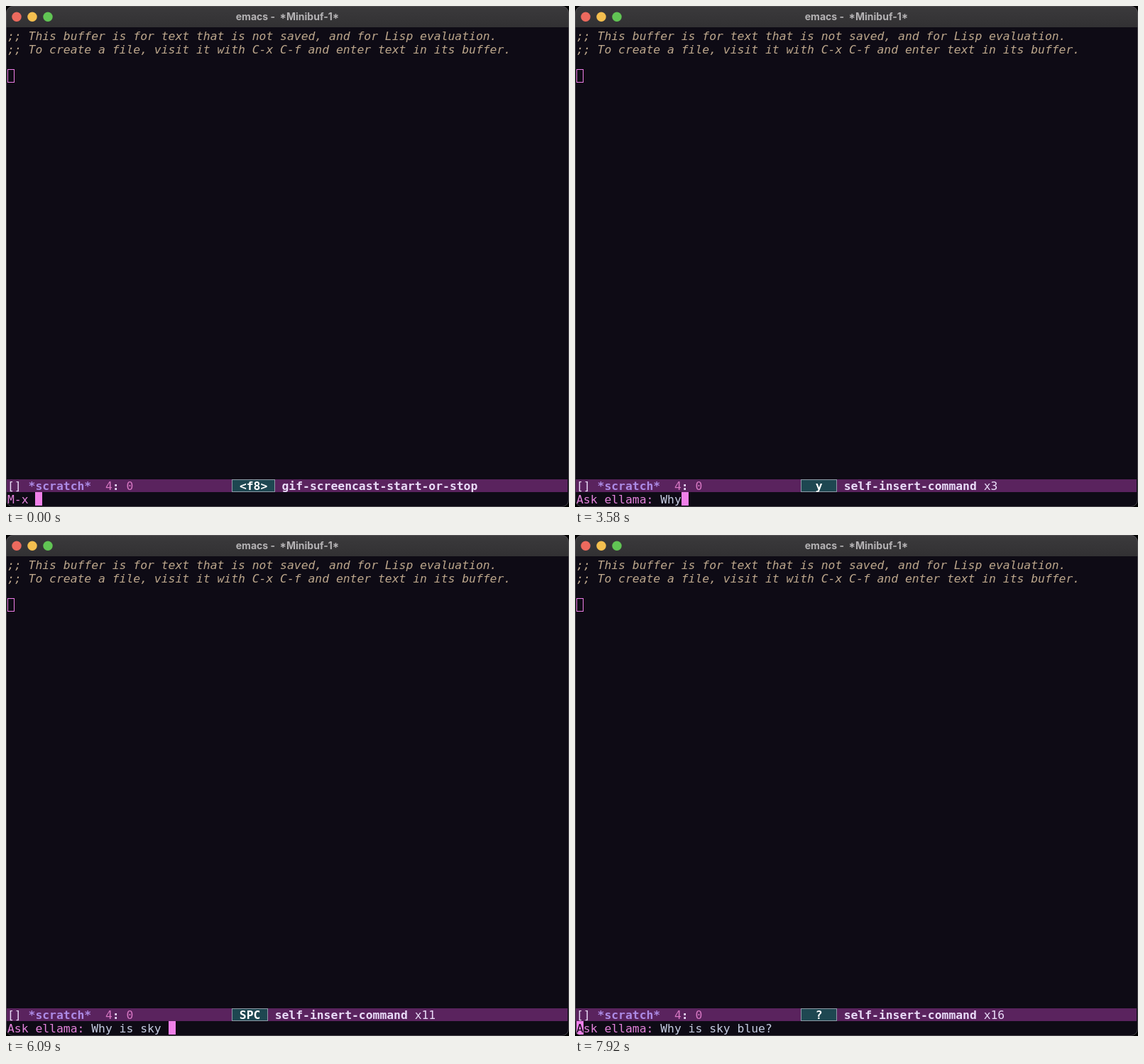
These frames come from a looping animation (793 by 706 pixels, 8 s). An HTML page:

```html
<!DOCTYPE html>
<html lang="en">
<head>
<meta charset="utf-8">
<title>Asking ellama</title>
<style>
  html, body { margin: 0; width: 100%; height: 100%; overflow: hidden; background: #000; }
  svg { display: block; width: 793px; height: 706px; }
  text { white-space: pre; font: 16.38px "DejaVu Sans Mono", "Noto Sans Mono", monospace; }
  .bold { font-weight: 700; }
  .comment { font-style: italic; fill: #bda78c; }
  .title { font: 700 14px Inter, "Liberation Sans", sans-serif; fill: #b5b3b5; text-anchor: middle; }
  .light { fill: #e9dcf8; }
  .pink { fill: #d777c3; }
  .prompt { fill: #e583dd; }
  .input { fill: #c6cde2; }
</style>
</head>
<body>
<svg viewBox="0 0 793 706">
  <defs>
    <linearGradient id="bar" x2="0" y2="1">
      <stop stop-color="#3b3a3c"/><stop offset="1" stop-color="#323133"/>
    </linearGradient>
    <clipPath id="window"><rect width="793" height="706" rx="10"/></clipPath>
  </defs>
  <g clip-path="url(#window)">
    <rect width="793" height="706" fill="#0e0b15"/>
    <rect width="793" height="30" fill="url(#bar)"/>
    <circle cx="15" cy="15.2" r="6.7" fill="#ed6a5e"/>
    <circle cx="37" cy="15.2" r="6.7" fill="#f4bf4f"/>
    <circle cx="59" cy="15.2" r="6.7" fill="#61c554"/>
    <text id="title" class="title" x="396.5" y="20"></text>
    <text class="comment" x="2" y="48">;; This buffer is for text that is not saved, and for Lisp evaluation.</text>
    <text class="comment" x="2" y="66.5">;; To create a file, visit it with C-x C-f and enter text in its buffer.</text>
    <rect x="2.5" y="89.5" width="9" height="18" fill="none" stroke="#ef7ee8"/>
    <rect x="1" y="667" width="790" height="18" fill="#5a235e"/>
    <text x="2" y="682" class="light">[] <tspan class="bold" fill="#ad8be6">*scratch*</tspan>  <tspan class="pink">4</tspan><tspan class="bold">:</tspan> <tspan class="pink">0</tspan></text>
    <rect id="keyBox" x="318.5" y="667.5" height="17" fill="#1e4751" stroke="#8d9aa6"/>
    <text id="key" class="bold" y="682" fill="#fff" text-anchor="middle"></text>
    <text id="command" y="682" class="light"><tspan id="name" class="bold"></tspan><tspan id="count"></tspan></text>
    <rect id="cursor" y="685" width="10" height="19" fill="#f180e9"/>
    <text x="2" y="700.5"><tspan id="first"></tspan><tspan id="prompt" class="prompt"></tspan><tspan id="input" class="input"></tspan></text>
  </g>
  <rect x=".5" y=".5" width="792" height="705" rx="9.5" fill="none" stroke="#5b595d" stroke-opacity=".75"/>
</svg>
<script>
  const LOOP = 8000, PITCH = 9.86, LEFT = 2;
  const PROMPT_AT = 1000, HOME_AT = 7920;
  const QUESTION = "Why is sky blue?";
  const KEY_TIMES = [2120, 3210, 3580, 4220, 4520, 4750, 4890, 5090,
                     5480, 5740, 6090, 6360, 6740, 6900, 7170, 7400];
  const ui = Object.fromEntries([...document.querySelectorAll("[id]")].map(el => [el.id, el]));

  function stateAt(time) {
    const typed = KEY_TIMES.filter(t => t <= time).length;
    if (time < PROMPT_AT)
      return { buffer: "*Minibuf-1*", key: "<f8>", name: "gif-screencast-start-or-stop", prompt: "M-x ", typed };
    if (!typed)
      return { buffer: "*scratch*", key: "RET", name: "exit-minibuffer", prompt: "Ask ellama: ", typed };
    const char = QUESTION[typed - 1];
    return { buffer: "*Minibuf-1*", key: char === " " ? "SPC" : char,
             name: "self-insert-command", prompt: "Ask ellama: ", typed };
  }

  function render(time) {
    const { buffer, key, name, prompt, typed } = stateAt(time);
    const atHome = time >= HOME_AT;
    const boxWidth = (Math.max(key.length, 3) + 2) * PITCH + 1;

    ui.title.textContent = "emacs -  " + buffer;
    ui.keyBox.setAttribute("width", Math.round(boxWidth));
    ui.key.setAttribute("x", 318.5 + boxWidth / 2);
    ui.key.textContent = key;
    ui.command.setAttribute("x", 318.5 + boxWidth + PITCH);
    ui.name.textContent = name;
    ui.count.textContent = typed > 1 ? " x" + typed : "";

    ui.first.textContent = prompt[0];
    ui.first.setAttribute("fill", atHome ? "#0e0b15" : "#e583dd");
    ui.prompt.textContent = prompt.slice(1);
    ui.input.textContent = QUESTION.slice(0, typed);
    const column = atHome ? 0 : prompt.length + typed;
    ui.cursor.setAttribute("x", Math.round(LEFT + column * PITCH));
  }

  const start = performance.now();
  function tick() {
    render((performance.now() - start) % LOOP);
    requestAnimationFrame(tick);
  }
  tick();
</script>
</body>
</html>
```
